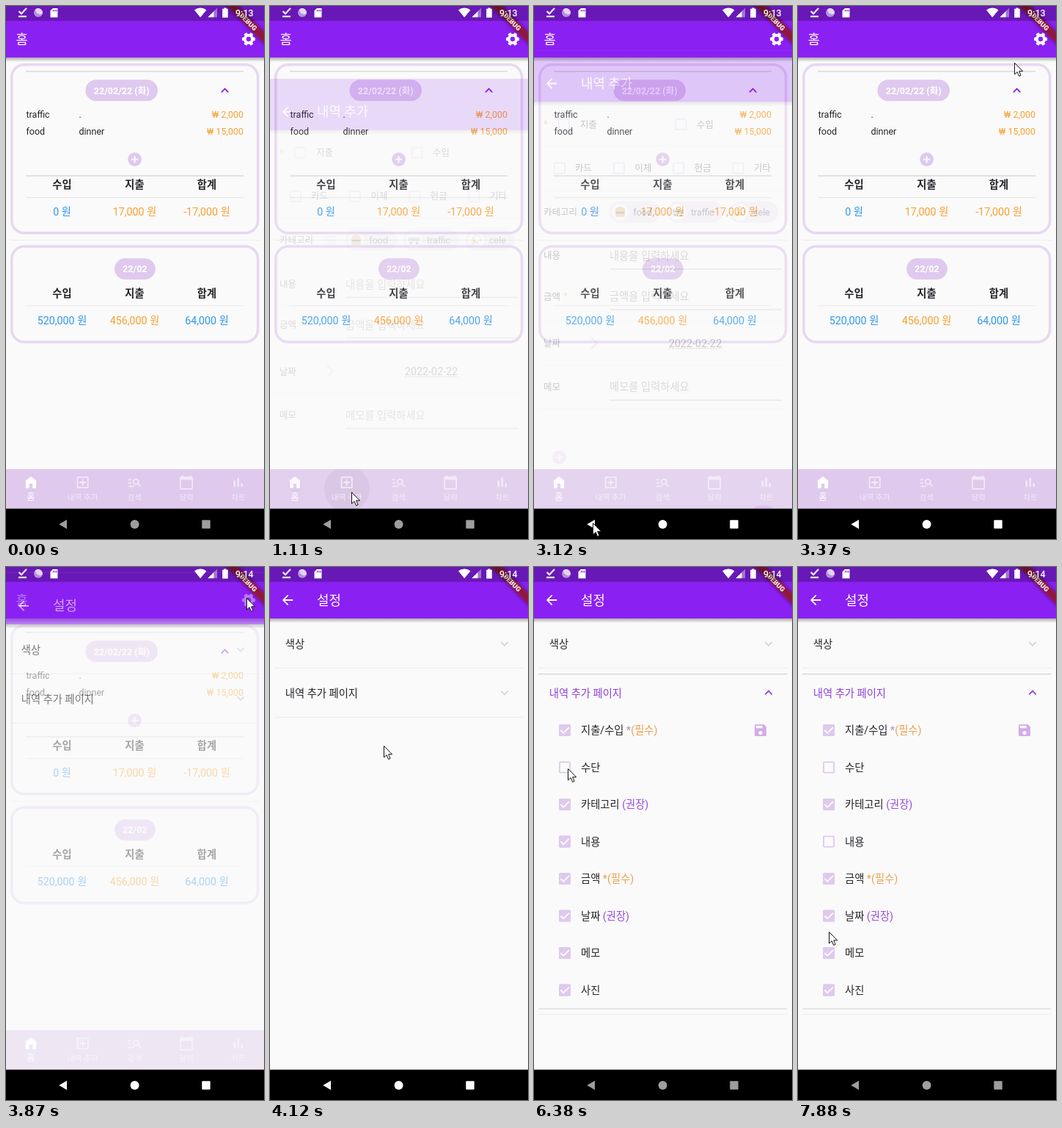
An HTML page for the animation above (8 s loop, 352 by 725 pixels).

```html
<!DOCTYPE html>
<html lang="ko">
<head>
<meta charset="utf-8">
<style>
html, body { margin: 0; width: 100%; height: 100%; overflow: hidden; background: #000; }
svg { display: block; width: 352px; height: 725px; }
text { font-family: Roboto, "Noto Sans CJK KR", "Noto Sans CJK", sans-serif; white-space: pre; }
</style>
</head>
<body>
<svg id="stage" viewBox="0 0 352 725"></svg>
<script>
const PURPLE = '#8b20f2', LILAC = '#dfc9ee', ORANGE = '#f9a031', BLUE = '#2f97ee';
const INK = '#262329', PAPER = '#fafafa', DP = 0.893;

// ---- drawing helpers ----
const rect = (x, y, w, h, fill, more = '') =>
  `<rect x="${x}" y="${y}" width="${w}" height="${h}" fill="${fill}" ${more}/>`;
const circle = (x, y, r, fill, more = '') =>
  `<circle cx="${x}" cy="${y}" r="${r}" fill="${fill}" ${more}/>`;
const text = (x, y, str, size = 12.5, fill = INK, more = '') =>
  `<text x="${x}" y="${y}" font-size="${size}" fill="${fill}" ${more}>${str}</text>`;
const mid = (x, y, str, size, fill, weight = 400) =>
  text(x, y, str, size, fill, `text-anchor="middle" font-weight="${weight}"`);
const line = (d, color, width, more = '') =>
  `<path d="${d}" fill="none" stroke="${color}" stroke-width="${width}" ${more}/>`;
const rule = (y, color = '#ececec', x1 = 6, x2 = 345.5, width = 1) =>
  line(`M${x1} ${y}H${x2}`, color, width);
const icon = (x, y, d, fill, more = '') =>
  `<path transform="translate(${x} ${y}) scale(${DP}) translate(-12 -12)" d="${d}" fill="${fill}" fill-rule="evenodd" ${more}/>`;
const pill = (x, y, w, h, fill) => rect(x, y, w, h, fill, `rx="${h / 2}"`);
const chevron = (x, y, dir, color, id = '') =>
  line(`M${x - 4.7} ${y - 2.4 * dir}L${x} ${y + 2.4 * dir}L${x + 4.7} ${y - 2.4 * dir}`, color, 1.8, id);
const plus = (x, y) => circle(x, y, 9.4, LILAC) +
  line(`M${x - 4.6} ${y}h9.2M${x} ${y - 4.6}v9.2`, '#fff', 1.8);
const emptyBox = (x, y) =>
  rect(x - 7.1, y - 7.1, 14.2, 14.2, 'none', `rx="1" stroke="${LILAC}" stroke-width="1.8"`);
const tick = (x, y) => line(`M${x - 5.6} ${y}l3.8 3.8l7.6 -7.6`, '#fff', 1.8);

const ICONS = {
  home: 'M12 3L4 9v12h5.5v-7h5v7H20V9z',
  add: 'M19 3H5c-1.1 0-2 .9-2 2v14c0 1.1.9 2 2 2h14c1.1 0 2-.9 2-2V5c0-1.1-.9-2-2-2zm0 16H5V5h14zm-8-2h2v-4h4v-2h-4V7h-2v4H7v2h4z',
  search: 'M2 7h5v2H2zM2 12h5v2H2zM2 17h10v2H2zM20.6 19l-3.8-3.8A5 5 0 1 1 18.2 13.8L22 17.6zM14 8a3 3 0 1 0 .01 0z',
  calendar: 'M20 3h-1V1h-2v2H7V1H5v2H4c-1.1 0-2 .9-2 2v16c0 1.1.9 2 2 2h16c1.1 0 2-.9 2-2V5c0-1.1-.9-2-2-2zm0 18H4V8h16z',
  chart: 'M5 9.2h3V19H5zM10.6 5h2.8v14h-2.8zM16.2 13H19v6h-2.8z',
  back: 'M20 11H7.8l5.6-5.6L12 4l-8 8 8 8 1.4-1.4L7.8 13H20z',
  list: 'M3 6h2v2H3zM3 11h2v2H3zM3 16h2v2H3zM7 6h14v2H7zM7 11h14v2H7zM7 16h14v2H7z',
  save: 'M17 3H5c-1.1 0-2 .9-2 2v14c0 1.1.9 2 2 2h14c1.1 0 2-.9 2-2V7zm-5 16a3 3 0 1 1 .01 0zm3-10H5V5h10z'
};

function gear(x, y) {
  let teeth = '';
  for (let a = 30; a < 390; a += 60)
    teeth += rect(-2.3, -9, 4.6, 5, '#fff', `rx="1" transform="rotate(${a})"`);
  return `<g transform="translate(${x} ${y})">${teeth}` +
    circle(0, 0, 5.1, 'none', 'stroke="#fff" stroke-width="3.8"') + '</g>';
}

function page(title, back, body) {
  const bar = rect(0, 0, 352, 70, PURPLE) + rect(0, 70, 352, 6, 'url(#shade)') +
    (back ? icon(24, 45, ICONS.back, '#fff') : '') +
    text(back ? 64 : 13.5, 51.5, title, 17.9, '#fff', 'font-weight="500"');
  return rect(0, 0, 352, 684, PAPER) + body + bar;
}

// ---- home page ----
function totals(y, sums, colors) {
  return ['수입', '지출', '합계'].map((name, i) => {
    const x = [76.5, 175.5, 274][i];
    return mid(x, y, name, 14.3, INK, 700) + mid(x, y + 36.5, sums[i] + ' 원', 14.3, colors[i]);
  }).join('');
}
const card = (y, h) => rect(7.8, y, 335.9, h, 'none', 'rx="17" stroke="#e6d8f1" stroke-width="3.6"');
const entry = (y, kind, note, cost) => text(27.5, y, kind) + text(99.5, y, note) +
  text(324, y, '₩ ' + cost, 12.5, ORANGE, 'text-anchor="end"');

function home() {
  const tabs = [['home', '홈'], ['add', '내역 추가'], ['search', '검색'], ['calendar', '달력'], ['chart', '차트']];
  const tabBar = rect(0, 630, 352, 54, '#dfc9ec') +
    circle(105, 657, 31, '#7d6488', 'id="ripple" opacity="0.1" clip-path="url(#tabs)"') +
    tabs.map(([name, label], i) => {
      const x = 34 + i * 70.7, fill = i ? '#f2e8f8' : '#fff';
      return icon(x, 648, ICONS[name], fill) + mid(x, 672, label, i ? 10.7 : 12.5, fill);
    }).join('');
  const first = card(79.8, 229) + rule(89, '#d9d9d9', 27, 324, 1.3) +
    pill(108.5, 100.3, 98.5, 29, LILAC) + mid(157.7, 119.7, '22/02/22 (화)', 12.5, '#fff', 700) +
    chevron(298.6, 115, -1, PURPLE) +
    entry(152, 'traffic', '.', '2,000') + entry(175.3, 'food', 'dinner', '15,000') +
    plus(175.6, 208.7) + rule(231, '#d9d9d9', 27, 324, 1.3) + rule(260.7, '#e2e2e2', 27, 324) +
    totals(248, ['0', '17,000', '-17,000'], [BLUE, ORANGE, ORANGE]);
  const second = card(327, 130) + pill(148, 343.2, 55.8, 28.8, LILAC) +
    mid(175.8, 362.3, '22/02', 12.5, '#fff', 700) + rule(407.5, '#ececec', 27, 324) +
    totals(396, ['520,000', '456,000', '64,000'], [BLUE, ORANGE, BLUE]);
  return page('홈', false, first + rule(318.5) + second + tabBar) + gear(331, 45);
}

// ---- entry form ----
function burger(x, y) {
  return line(`M${x - 6.5} ${y + 2.2}h13`, '#7fb043', 2) + line(`M${x - 6} ${y + .6}h12`, '#6b3a22', 2.6) +
    `<path d="M${x - 7} ${y - 1}a7 6.5 0 0 1 14 0z" fill="#e09a4b"/>` +
    rect(x - 6.5, y + 3, 13, 3.6, '#e09a4b', 'rx="1.6"');
}
function bus(x, y) {
  return rect(x - 8, y - 4, 16, 8, '#c5ccd3', 'rx="1"') + rect(x - 7, y - 3, 14, 3.6, '#6fa3c4') +
    circle(x - 4, y + 4.3, 1.6, '#4b4f54') + circle(x + 4.5, y + 4.3, 1.6, '#4b4f54');
}
function popper(x, y) {
  const dots = ['#e8505b', '#4aa3df', '#f2b632', '#8f5bd0', '#58b368', '#e8505b'];
  return `<path d="M${x - 7} ${y + 7}l3.5 -9l5.5 5.5z" fill="#eab13c"/>` + dots.map((c, i) =>
    circle(x + 1 + 5 * Math.cos(i * 1.1 - 3), y - 2 + 5.2 * Math.sin(i * 1.1 - 3), 1.2, c)).join('');
}
const tag = (x, w, name, art) => pill(x, 205.2, w, 29, '#e8daf2') +
  circle(x + 14.5, 219.7, 11.3, PAPER) + art(x + 14.5, 219.7) + text(x + 32.3, 224.2, name);
const field = (y, hint) => text(103, y, hint, 14.3, '#717171') + rule(y + 12.7, '#929292', 103, 338);

function form() {
  const option = (box, x, y, label) => emptyBox(box, y) + text(x, y + 4.6, label);
  const labels = [['카테고리', 224.2], ['내용', 284], ['금액', 339.3], ['날짜', 402.7], ['메모', 462.5]];
  const pays = [['카드', 35, 56], ['이체', 116, 137.5], ['현금', 197.3, 218.7], ['기타', 278.6, 300]];
  return page('내역 추가', true,
    [130.5, 190, 249.3, 308.7, 368.3, 428, 487.5, 619.5].map(y => rule(y)).join('') +
    labels.map(([s, y]) => text(13, y, s)).join('') +
    text(12.8, 106, '*', 14, ORANGE) + text(40, 340, '*', 14, ORANGE) +
    option(41, 63, 100.5, '지출') + option(200.5, 222, 100.5, '수입') +
    pays.map(([s, box, x]) => option(box, x, 160, s)).join('') +
    icon(81.5, 219.5, ICONS.list, LILAC) +
    tag(103, 69.7, 'food', burger) + tag(181.7, 76, 'traffic', bus) + tag(266.7, 66.5, 'cele', popper) +
    field(284.7, '내용을 입력하세요') + field(339.8, '금액을 입력하세요') + field(463, '메모를 입력하세요') +
    line('M78 390.5l7.5 7.5l-7.5 7.5', LILAC, 2.2) +
    text(184, 403.2, '2022-02-22', 14.3) + line('M184 405.3h73', '#666', 1, 'stroke-dasharray="2.5 1.5"') +
    plus(34.6, 553.6) +
    circle(313, 647, 25, '#000', 'opacity="0.28" filter="url(#soft)"') +
    circle(313, 644, 25.3, '#d3abeb') + line('M305.2 644.5l5 5l10.6 -10.6', '#fff', 1.9));
}

// ---- settings page ----
function settings() {
  const must = '#eba04d', wish = '#974bdc';
  const rows = [['지출/수입 ', '*', '(필수)'], ['수단'], ['카테고리 ', '(권장)'], ['내용'],
    ['금액 ', '*(필수)'], ['날짜 ', '(권장)'], ['메모'], ['사진']];
  const list = rows.map(([name, ...notes], i) => {
    const y = 222 + i * 50.5;
    const tail = notes.map(s => {
      const fill = s === '*' ? '#a98fc4' : s.includes('필수') ? must : wish;
      return `<tspan fill="${fill}">${s}</tspan>`;
    }).join('');
    return emptyBox(42, y) + `<g id="tick${i}">${rect(34, y - 8, 16, 16, LILAC, 'rx="1.5"')}${tick(42, y)}</g>` +
      text(64, y + 5.3, name + tail, 14.3);
  }).join('');
  return page('설정', true,
    text(20.8, 110, '색상', 14.3) + chevron(320, 104.5, 1, '#d9d0e4') + rule(137.5) +
    line('M6 145.7H345.5', '#d3d3d3', 1.2, 'id="topEdge"') +
    text(20.8, 177, '내역 추가 페이지', 14.3, INK, 'id="tile"') +
    chevron(320, 171, 1, '#d9d0e4', 'id="closed"') + chevron(320, 171, -1, '#9140d8', 'id="open"') +
    `<g clip-path="url(#fold)">${list}${icon(309, 222, ICONS.save, '#d2ace9')}</g>` +
    `<g id="foot">${line('M6 197H345.5', '#d3d3d3', 1.2, 'id="lowEdge"')}${rule(204.5)}</g>`);
}

// ---- system bars ----
function system() {
  const banner = `<g transform="translate(352 0) rotate(45)">` +
    rect(-60, 25, 120, 10.7, '#000', 'opacity="0.5" filter="url(#soft)"') +
    rect(-60, 25, 120, 10.7, '#b71c1c', 'opacity="0.63"') + mid(0, 33.6, 'DEBUG', 9.1, '#fff', 900) + '</g>';
  const status = rect(0, 0, 352, 20.3, '#000', 'opacity="0.25"') +
    line('M17.5 7l3.5 3.5l7 -7.5M17 14.3h11', '#fff', 2) +
    circle(44, 9, 6, '#b58fdc') + `<path d="M40 4.5a6 6 0 0 1 9.5 6.5a7 7 0 0 1 -9.5 -6.5z" fill="#e4d4f3"/>` +
    `<path d="M64 3h6.5v12.5h-10V6.5z" fill="#fff"/>` + line('M64.5 5v2.6M66.7 5v2.6M68.9 5v2.6', '#681ab5', 1) +
    `<path d="M257 5.5a12.5 12.5 0 0 1 16.5 0L265.2 15.5z" fill="#fff"/>` +
    `<path d="M288 2.7v12.6h-12.6z" fill="#fff" opacity="0.4"/><path d="M283.5 7.2v8.1h-8.1z" fill="#fff"/>` +
    `<path d="M297.5 2.5h3v1.3h2.3v12h-7.6v-12h2.3z" fill="#fff"/>` +
    text(313, 14, '9:13', 12.5, '#fff', 'id="clock" font-weight="500"');
  const nav = rect(0, 683.7, 352, 42, '#000') +
    `<g id="nav"><path d="M72.3 705L83 698.8V711.2z"/><circle cx="175.6" cy="705" r="6"/>` +
    `<rect x="267.3" y="699.3" width="11.4" height="11.4" rx="0.8"/></g>`;
  return banner + status + nav;
}

const $ = id => document.getElementById(id);
$('stage').innerHTML = `<defs>
  <linearGradient id="shade" x2="0" y2="1"><stop stop-color="#000" stop-opacity="0.32"/>
  <stop offset="1" stop-color="#000" stop-opacity="0"/></linearGradient>
  <filter id="soft" x="-50%" y="-100%" width="200%" height="300%"><feGaussianBlur stdDeviation="2.6"/></filter>
  <clipPath id="tabs"><rect x="0" y="630" width="352" height="54"/></clipPath>
  <clipPath id="fold"><rect id="foldBox" x="0" y="197" width="352" height="0"/></clipPath></defs>
  <g>${home()}</g><g id="form">${form()}</g><g id="settings">${settings()}</g>${system()}
  <path id="cursor" d="M.5 .5V16l3.6-3.3 2.5 5.8 2.5-1.1-2.5-5.6h5z" fill="#fff" stroke="#111" stroke-width="1"/>`;

// ---- motion ----
const LOOP = 8000, TICK = 125;
// tick, x, y of the pointer tip
const PATH = [[3, 337, 712], [7, 111, 661], [11, 111, 661], [15, 269, 28], [17, 154, 532],
  [19, 110, 685], [22, 98, 706], [23, 80, 703], [25, 80, 703], [27, 295, 77], [28, 327, 42],
  [31, 328, 42], [33, 155, 243], [35, 140, 168], [38, 140, 168], [41, 100, 316], [43, 82, 302],
  [47, 45, 274], [51, 46, 274], [53, 50, 362], [55, 46, 368], [58, 45, 370], [61, 44, 469], [63, 42, 496]];

const clamp = v => Math.min(1, Math.max(0, v));
function bezier(x1, y1, x2, y2) {
  const at = (a, b, u) => 3 * a * u * (1 - u) ** 2 + 3 * b * u * u * (1 - u) + u ** 3;
  return x => {
    if (x <= 0 || x >= 1) return clamp(x);
    let lo = 0, hi = 1;
    for (let i = 0; i < 20; i++) {
      const u = (lo + hi) / 2;
      if (at(x1, x2, u) < x) lo = u; else hi = u;
    }
    return at(y1, y2, lo);
  };
}
const slide = bezier(.4, 0, .2, 1), easeIn = bezier(.42, 0, 1, 1);

function pointer(k) {
  const i = PATH.findIndex(p => p[0] > k);
  if (i < 0) return PATH[PATH.length - 1].slice(1);
  if (i === 0) return [0, 0];
  const [k0, x0, y0] = PATH[i - 1], [k1, x1, y1] = PATH[i], f = (k - k0) / (k1 - k0);
  return [Math.round(x0 + (x1 - x0) * f), Math.round(y0 + (y1 - y0) * f)];
}
function set(id, attrs) {
  for (const name in attrs) $(id).setAttribute(name, attrs[name]);
}
const show = (id, on) => set(id, { visibility: on ? 'visible' : 'hidden' });
function reveal(id, p) {
  set(id, { opacity: easeIn(p), transform: `translate(0 ${171 * (1 - slide(p))})` });
  show(id, p > 0);
}

function draw(ms) {
  const k = Math.floor((ms + 20) / TICK), t = k * TICK;
  const ramp = (start, length) => clamp((t - start) / length);

  reveal('form', ramp(1029, 300) - ramp(2950, 300));
  reveal('settings', ramp(3654, 300));
  show('ripple', k === 9 || k === 10);

  const fold = easeIn(ramp(4530, 200));
  set('foldBox', { height: 404 * fold });
  set('foot', { transform: `translate(0 ${404 * fold})` });
  set('topEdge', { opacity: fold });
  set('lowEdge', { opacity: fold });
  set('tile', { fill: fold > 0.5 ? '#9140d8' : INK });
  set('closed', { opacity: 1 - fold });
  set('open', { opacity: fold });
  set('tick1', { opacity: 1 - ramp(6080, 200) });
  set('tick3', { opacity: 1 - ramp(6950, 200) });

  const glow = Math.round(158 + 97 * (ramp(2870, 125) - ramp(4600, 375)));
  set('nav', { fill: `rgb(${glow},${glow},${glow})` });
  $('clock').textContent = k < 30 ? '9:13' : '9:14';

  set('cursor', { transform: `translate(${pointer(k)})` });
  show('cursor', k === 3 || k >= 7);
}

const begin = performance.now();
function frame() {
  draw((performance.now() - begin) % LOOP);
  requestAnimationFrame(frame);
}
frame();
</script>
</body>
</html>
```
